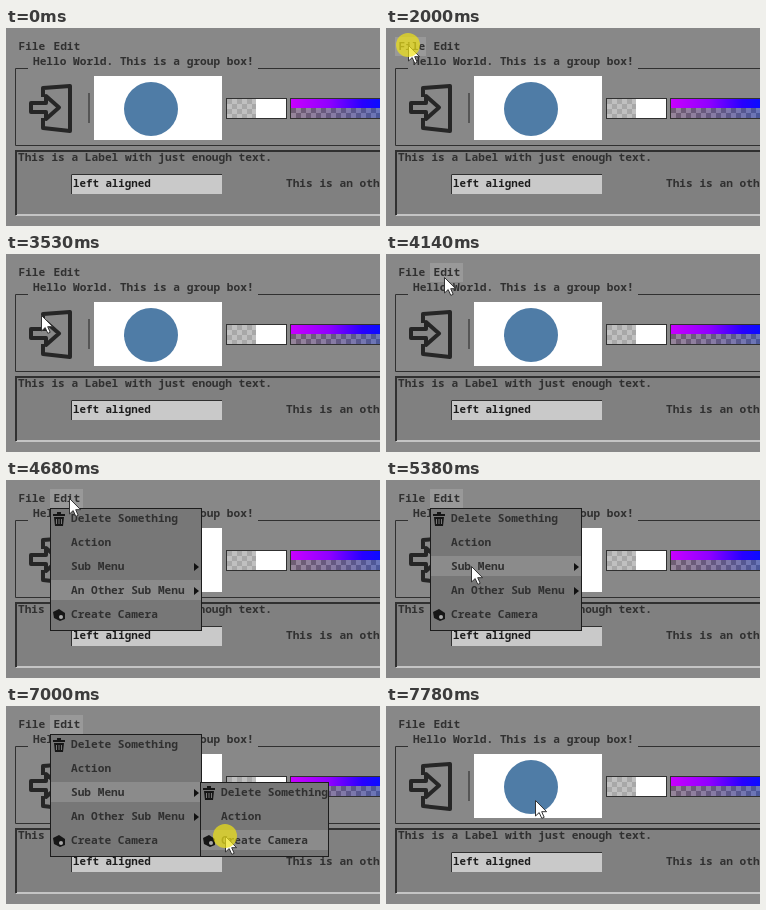
These frames come from a looping animation (374x198 px, 7.85 s). An HTML page:

```html
<!DOCTYPE html>
<html lang="en">
<head>
<meta charset="utf-8">
<title>Menu demo</title>
<style>
html, body { margin: 0; width: 100%; height: 100%; overflow: hidden; background: #888; }
svg { display: block; width: 374px; height: 198px; }
text { font: 600 11.15px "Noto Sans Mono", "DejaVu Sans Mono", monospace; fill: #303030; }
.field text { font-size: 10.8px; fill: #1c1c1c; }
.line { fill: none; stroke: #303030; }
.panel { fill: #777; stroke: #1c1c1c; }
.lit { fill: #8b8b8b; }
</style>
</head>
<body>
<svg id="stage" viewBox="0 0 374 198">
  <defs>
    <pattern id="checks" x="221" y="71" width="10" height="10" patternUnits="userSpaceOnUse">
      <path d="M0 0H10V10H0Z" fill="#c0c0c0"/><path d="M0 0H5V5H0ZM5 5H10V10H5Z" fill="#a8a8a8"/>
    </pattern>
    <pattern id="darkChecks" x="285" y="80" width="10" height="10" patternUnits="userSpaceOnUse">
      <path d="M0 0H10V10H0Z" fill="#989898"/><path d="M0 0H5V5H0ZM5 5H10V10H5Z" fill="#6c6c6c"/>
    </pattern>
    <linearGradient id="hues"><stop stop-color="#c800ff"/><stop offset=".4" stop-color="#9000ff"/><stop offset=".75" stop-color="#2800ff"/><stop offset="1" stop-color="#0010ff"/></linearGradient>
    <linearGradient id="fade"><stop stop-color="#80a" stop-opacity=".12"/><stop offset="1" stop-color="#03f" stop-opacity=".35"/></linearGradient>
    <g id="trash" fill="#161616">
      <path d="M-6 -5H6V-3H-6ZM-2 -7H2V-5H-2ZM-5 -2H5L4 7H-4Z"/>
      <path d="M-2.5 0V5M0 0V5M2.5 0V5" stroke="#777"/>
    </g>
    <g id="camera">
      <path d="M-6 -3L0 -6L6 -2V4L1 6L-5 3Z" fill="#161616"/>
      <circle cx="2" cy="2" r="2" fill="#a8a8a8"/>
    </g>
  </defs>
  <path d="M10 123H374V187H10Z" fill="#808080"/>
  <path class="line" d="M22 40.5H9.5V117.5H374M252 40.5H374"/>
  <g fill="none" stroke="#262626" stroke-width="4" stroke-linejoin="round">
    <path d="M37 69V60L64 58V103L37 100V90"/>
    <path d="M25 75H40V68L53 79.5L40 91V84H25Z"/>
  </g>
  <path d="M83 65V95" stroke="#444" stroke-width="1.5"/>
  <path d="M88 48H216V112H88Z" fill="#fff"/>
  <circle cx="145" cy="81" r="27" fill="#4f7ca6"/>
  <path d="M221 71H250V90H221Z" fill="url(#checks)"/>
  <path d="M250 71H280V90H250Z" fill="#fff"/>
  <rect class="line" x="220.5" y="70.5" width="60" height="20"/>
  <rect x="285" y="71" width="95" height="9" fill="url(#hues)"/>
  <rect x="285" y="80" width="95" height="10" fill="url(#darkChecks)"/>
  <rect x="285" y="80" width="95" height="10" fill="url(#fade)"/>
  <rect class="line" x="284.5" y="70.5" width="100" height="20"/>
  <path d="M10 187H374" stroke="#c4c4c4" stroke-width="2"/>
  <path class="line" d="M10 187V123H374" stroke-width="2"/>
  <path d="M65 146H216V166H65Z" fill="#c9c9c9"/>
  <path class="line" d="M65.5 166V146.5H216"/>
  <g id="ui"></g>
  <path id="cursor" d="M.5 .5V16L4.2 12.6L6.8 18.4L9.2 17.3L6.7 11.7H11.6Z" fill="#fff" stroke="#333"/>
  <circle id="press" r="12" fill="#f0e314" fill-opacity=".7"/>
</svg>
<script>
const LOOP = 7850, TICKS = 102, ROW = 24;
const $ = id => document.getElementById(id);
const show = (el, on) => { el.style.display = on ? '' : 'none'; };
const label = (x, middle, s) => `<text x="${x}" y="${middle + 4}">${s}</text>`;
const box = (cls, x, y, w, h) => `<rect class="${cls}" x="${x}" y="${y}" width="${w}" height="${h}"/>`;
const inside = (x, y, r) => x >= r.x && x < r.x + r.w && y >= r.y && y < r.y + r.h;

const trash = ['Delete Something', 'trash'], action = ['Action'], camera = ['Create Camera', 'camera'];
// open and close are ticks
const menus = [
  { id: 'file', x: 9, y: 28, w: 113, h: 51, items: [action, camera], open: 27, close: 45 },
  { id: 'edit', x: 44, y: 28, w: 152, h: 123, open: 59, close: 92,
    items: [trash, action, ['Sub Menu', 'more'], ['An Other Sub Menu', 'more'], camera] },
  { id: 'sub', x: 194, y: 76, w: 129, h: 75, items: [trash, action, camera], open: 73, close: 92 }
];
const tabs = [
  { name: 'File', x: 9, y: 9, w: 31, h: 19, menu: menus[0] },
  { name: 'Edit', x: 44, y: 9, w: 33, h: 19, menu: menus[1] }
];
const clicks = [26, 44, 58, 72, 91];
// cursor stops: tick, x, y
const stops = [
  [2, 366, 298], [5, 81, -41], [11, 30, -21], [12, 27, 7], [17, 22, 17],
  [32, 22, 17], [38, 33, 51], [42, 35, 61], [47, 35, 61], [54, 58, 23], [56, 63, 18],
  [62, 63, 18], [70, 85, 86], [76, 85, 86], [79, 197, 88], [80, 207, 89],
  [82, 207, 89], [89, 219, 130], [99, 219, 130], [100, 197, 119], [101, 149, 94]
];

function menuMarkup({ id, x, y, w, h, items }) {
  const rows = items.map(([name, mark], i) => {
    const mid = y + 10 + ROW * i;
    const icon = mark === 'more'
      ? `<path d="M${x + 144} ${mid - 3}l5 4l-5 4z" fill="#111"/>`
      : mark ? `<use href="#${mark}" x="${x + 9}" y="${mid + 1}"/>` : '';
    return box('lit', x + 1, mid - 10, w - 2, 20) + icon + label(x + 21, mid, name);
  });
  return `<g id="${id}">${box('panel', x + .5, y + .5, w - 1, h - 1)}${rows.join('')}</g>`;
}

$('ui').innerHTML =
  label(27, 33, 'Hello World. This is a group box!') +
  label(12, 129, 'This is a Label with just enough text.') +
  `<g class="field">${label(67, 155, 'left aligned')}</g>` +
  label(280, 155, 'This is an other label') +
  tabs.map(t => `<rect id="${t.name}" x="${t.x}" y="${t.y}" width="${t.w}" height="${t.h}" fill="#999"/>` +
    label(t.x + 3.5, 18, t.name)).join('') +
  menus.map(menuMarkup).join('');

function cursorAt(tick) {
  const i = stops.findIndex(s => s[0] >= tick);
  if (i < 1) return [stops[0][1], stops[0][2]];
  const [t0, x0, y0] = stops[i - 1], [t1, x1, y1] = stops[i];
  const k = (tick - t0) / (t1 - t0);
  return [x0 + (x1 - x0) * k, y0 + (y1 - y0) * k];
}

function draw(tick) {
  const [x, y] = cursorAt(tick);
  const isOpen = m => tick >= m.open && tick < m.close;
  const subOpen = isOpen(menus[2]);
  for (const t of tabs) show($(t.name), isOpen(t.menu) || inside(x, y, t));
  for (const m of menus) {
    show($(m.id), isOpen(m));
    $(m.id).querySelectorAll('.lit').forEach((el, i) => {
      const row = { x: m.x + 6, y: m.y + ROW * i, w: m.w - 7, h: 20 };
      const covered = m.id === 'edit' && subOpen;
      // the last used row stays lit until the cursor enters the menu
      const active = m.id === 'edit' && (subOpen ? i === 2 : i === 3 && y < m.y);
      show(el, active || !covered && inside(x, y, row));
    });
  }
  const at = `translate(${Math.round(x)} ${Math.round(y)})`;
  $('cursor').setAttribute('transform', at);
  $('press').setAttribute('transform', at);
  show($('press'), clicks.some(c => tick === c || tick === c + 1));
}

function loop() {
  // small lead absorbs the uneven tick lengths
  draw(Math.floor((performance.now() % LOOP + 16) / LOOP * TICKS) % TICKS);
  requestAnimationFrame(loop);
}
loop();
</script>
</body>
</html>
```
